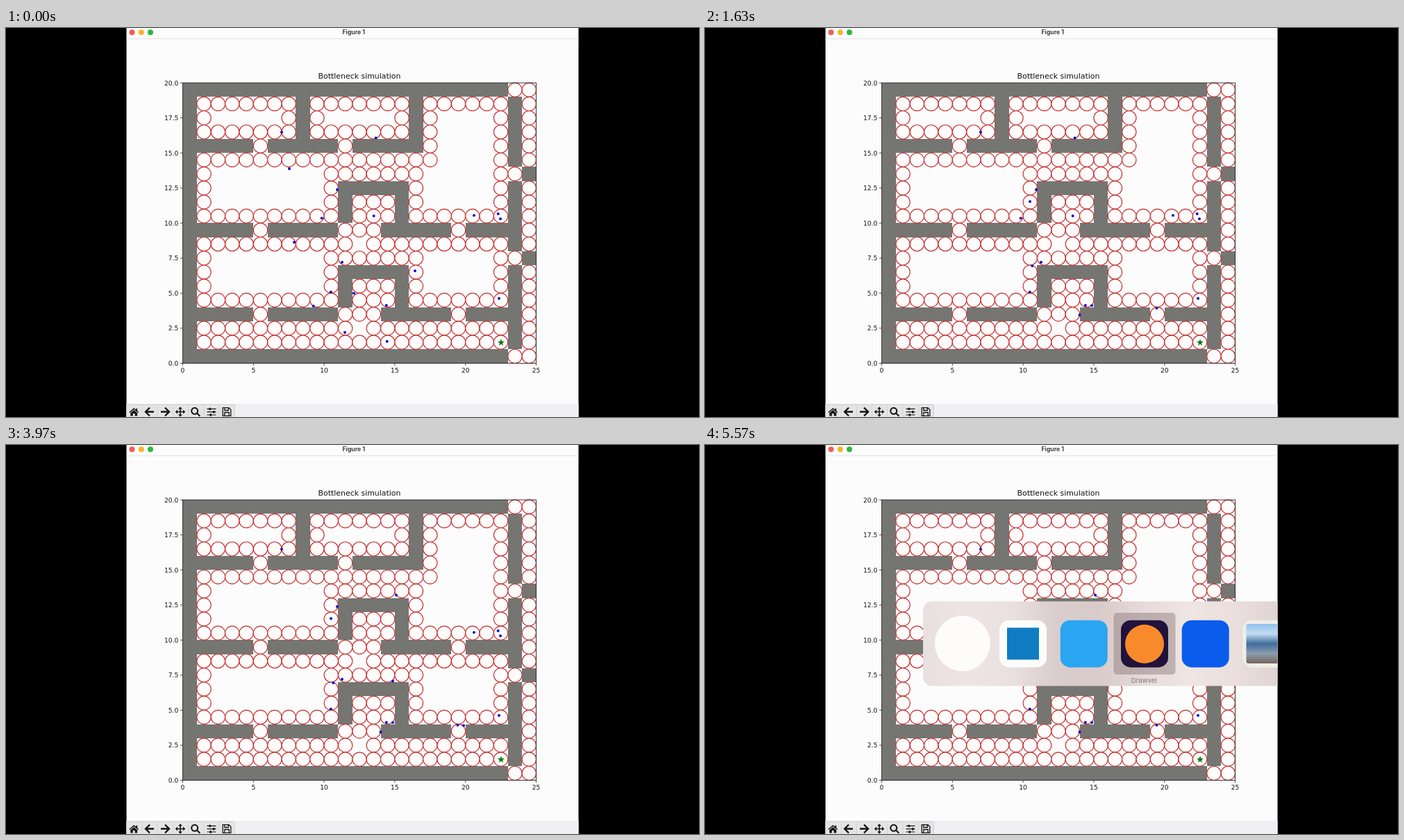
An HTML page with a canvas for the animation above (5600 ms loop, 998x561 px).

```html
<!DOCTYPE html>
<html lang="en">
<head>
<meta charset="utf-8">
<title>Bottleneck simulation</title>
<style>
html, body { margin: 0; height: 100%; overflow: hidden; background: #000; }
canvas { display: block; width: 998px; height: 561px; }
</style>
</head>
<body>
<canvas id="stage" width="998" height="561"></canvas>
<script>
const g = document.getElementById('stage').getContext('2d');
const LOOP = 5600, SPEED = 0.44; // ms, px per ms
const LEFT = 254.5, BOTTOM = 483.5, CW = 20.36, CH = 20.22;
const px = x => LEFT + x * CW, py = y => BOTTOM - y * CH;

// '#' wall, 'o' waypoint circle; first row is the top
const MAP = [
  '#######################oo',
  '#ooooooo#ooooooo#oooooo#o',
  '#o.....o#o.....o#o....o#o',
  '#ooooooo#ooooooo#o....o#o',
  '#####o#####o#####o....o#o',
  '#ooooooooooooooooo....o#o',
  '#o........ooooooo.....oo#',
  '#o........o#####o.....o#o',
  '#o........o#ooo#o.....o#o',
  '#oooooooooo#ooo#ooooooo#o',
  '#####o#####ooo#####o####o',
  '#ooooooooooo.oooooooooo#o',
  '#o........ooooooo.....oo#',
  '#o........o#####o.....o#o',
  '#o........o#ooo#o.....o#o',
  '#oooooooooo#ooo#ooooooo#o',
  '#####o#####ooo#####o####o',
  '#ooooooooooo.oooooooooo#o',
  '#oooooooooooooooooooooo#o',
  '#######################oo'
];

const RESTING = [[397, 150.3], [477, 233], [674, 270.2], [708.7, 268], [712, 275.3],
  [484, 337.8], [467.8, 380.7], [547.8, 400], [710, 390]];

// path, departure time, time it leaves the picture, time it enters
const MOVERS = [
  { path: [[408, 203], [468, 250.3]], go: 30 },
  { path: [[415, 309], [471.3, 343]], go: 30 },
  { path: [[589, 350.3], [626, 377], [650.5, 404]], go: 30 },
  { path: [[501, 382.5], [557, 400.3]], go: 30 },
  { path: [[442.7, 401], [473, 392], [485, 410], [502.5, 408.7], [539.5, 414]], go: 335 },
  { path: [[488, 439], [505, 452], [690, 451.3]], go: 30, end: 570 },
  { path: [[548.7, 452], [712, 453]], go: 30, end: 400 },
  { path: [[532.7, 158.5], [488, 170], [498, 200], [562, 216.5]], go: 1960 },
  { path: [[454.7, 274.3], [478, 281], [490, 300], [557, 340.5]], go: 1960 },
  { path: [[529.7, 271], [510, 291], [500, 328], [590, 345], [659, 404.5]], go: 2074, end: 4400 },
  { path: [[659, 404.5], [652, 415], [690, 451.3]], go: 4400, end: 4540, from: 4400 }
];

function along(path, dist) {
  for (let i = 1; i < path.length; i++) {
    const [x, y] = path[i - 1], dx = path[i][0] - x, dy = path[i][1] - y;
    const len = Math.hypot(dx, dy);
    if (dist < len) return [x + dx * dist / len, y + dy * dist / len];
    dist -= len;
  }
  return path[path.length - 1];
}

function rect(x, y, w, h, fill, r = 0) {
  g.fillStyle = fill;
  g.beginPath();
  g.roundRect(x, y, w, h, r);
  g.fill();
}

function disc(x, y, r, fill) {
  g.fillStyle = fill;
  g.beginPath();
  g.arc(x, y, r, 0, 7);
  g.fill();
}

function line(color, width, ...points) {
  g.strokeStyle = color;
  g.lineWidth = width;
  g.beginPath();
  points.forEach(([x, y], i) => i ? g.lineTo(x, y) : g.moveTo(x, y));
  g.stroke();
}

function text(str, x, y, font, align = 'center', fill = '#111') {
  g.font = font;
  g.textAlign = align;
  g.fillStyle = fill;
  g.fillText(str, x, y);
}

function blend(x0, y0, x1, y1, ...stops) {
  const grad = g.createLinearGradient(x0, y0, x1, y1);
  stops.forEach((c, i) => grad.addColorStop(i / (stops.length - 1), c));
  return grad;
}

function icon(x, y, d, width) {
  g.save();
  g.translate(x, y);
  g.fillStyle = g.strokeStyle = '#151515';
  g.lineWidth = width;
  width ? g.stroke(new Path2D(d)) : g.fill(new Path2D(d));
  g.restore();
}

function drawWindow() {
  rect(0, 0, 998, 561, '#000');
  rect(173.5, 0, 651, 561, '#fdfcfd');
  rect(173.5, 15, 651, 1, '#e3e2e3');
  disc(181.5, 6.3, 4, '#ec5f58');
  disc(194.8, 6.3, 4, '#f5b32f');
  disc(208, 6.3, 4, '#2db83d');
  text('Figure 1', 500.7, 9.4, 'bold 8.6px Inter, sans-serif', 'center', '#3d3d3d');
}

function drawToolbar() {
  rect(173.5, 542, 651, 19, '#f0eff1');
  rect(173.5, 543, 155.5, 18, '#e5e4e5');
  for (let i = 0; i < 8; i++) rect(173.5 + i * 22.2, 543, 0.8, 18, '#cfcfcf');
  rect(173.5, 542.6, 155.5, 0.8, '#cfcfcf');
  const arrow = 'M-6 0H6M0-6L-6 0L0 6';
  icon(184.2, 554, 'M-7 0L0-6L3-3.4V-5.2H5V-1.7L7 0L6 1L0-4L-6 1ZM-5 1.2L0-2.9L5 1.2V5.5H1.4V2H-1.4V5.5H-5Z');
  icon(207, 553.5, arrow, 2.4);
  g.save();
  g.scale(-1, 1);
  icon(-229, 553.5, arrow, 2.4);
  g.restore();
  icon(251, 553.5, 'M-5 0H5M0-5V5', 1.6);
  icon(251, 553.5, 'M0-7.3L3-4H-3ZM0 7.3L3 4H-3ZM-7.3 0L-4-3V3ZM7.3 0L4-3V3Z');
  icon(273, 553.5, 'M3.2-1.2A4.5 4.5 0 1 1-5.8-1.2A4.5 4.5 0 1 1 3.2-1.2M2 2L6.3 6.3', 2.1);
  icon(296, 553.7, 'M-6.5-4.3H6.5M-6.5 0H6.5M-6.5 4.3H6.5', 1.2);
  icon(296, 553.7, 'M-3.5-6H-1V-2.6H-3.5ZM2-1.7H4.5V1.7H2ZM-2.5 2.6H0V6H-2.5Z');
  icon(318, 553.5, 'M-5.8-5.8H3L5.8-3V5.8H-5.8ZM-3.2-5.5V-2H2.2V-5.5M-3.2 5.5V1H3.2V5.5', 1.3);
}

function drawPlot() {
  MAP.forEach((row, r) => [...row].forEach((cell, c) => {
    if (cell !== '#') return;
    const x = Math.round(px(c)), y = Math.round(py(20 - r));
    rect(x, y, Math.round(px(c + 1)) - x, Math.round(py(19 - r)) - y, '#757572');
  }));
  g.strokeStyle = '#c53232';
  g.lineWidth = 1.15;
  g.fillStyle = '#fffdfc';
  MAP.forEach((row, r) => [...row].forEach((cell, c) => {
    if (cell !== 'o') return;
    g.beginPath();
    g.ellipse(px(c + 0.5), py(19.5 - r), CW / 2, CH / 2, 0, 0, 7);
    g.fill();
    g.stroke();
  }));
  g.strokeStyle = '#222';
  g.lineWidth = 0.9;
  g.strokeRect(LEFT, py(20), CW * 25, CH * 20);

  const font = '9.11px "DejaVu Sans", sans-serif';
  for (let v = 0; v <= 25; v += 5) {
    line('#222', 0.8, [px(v), BOTTOM], [px(v), BOTTOM + 3.5]);
    text(v, px(v), 497, font);
  }
  for (let v = 0; v <= 20; v += 2.5) {
    line('#222', 0.8, [LEFT - 3.5, py(v)], [LEFT, py(v)]);
    text(v.toFixed(1), 248.2, py(v) + 3.4, font, 'right');
  }
  text('Bottleneck simulation', 509, 73, '10.93px "DejaVu Sans", sans-serif');

  g.fillStyle = '#087808';
  g.beginPath();
  for (let i = 0; i < 10; i++) {
    const a = i * Math.PI / 5, r = i % 2 ? 2.1 : 5.4;
    g.lineTo(713 + r * Math.sin(a), 453.6 - r * Math.cos(a));
  }
  g.fill();
}

function drawDots(t) {
  const dot = ([x, y]) => disc(x, y, 2, '#0b0bd2');
  RESTING.forEach(dot);
  for (const { path, go, end = LOOP, from = 0 } of MOVERS)
    if (t >= from && t < end) dot(along(path, Math.max(0, t - go) * SPEED));
}

function drawSwitcher(pick) {
  g.save();
  g.beginPath();
  g.rect(173.5, 0, 651, 561);
  g.clip();
  rect(314, 225.5, 560, 122, blend(314, 0, 825, 0,
    '#e8e0de', '#eee4e3', '#eae0df', '#d9cdcd', '#d8cbc9', '#e6dbda', '#efe5e3', '#eadfdd', '#dfd4d3'), 13);
  rect(501 + pick * 87.5, 242, 89, 89, 'rgba(112, 92, 92, .36)', 5);
  text(['Trunda', 'Drawvel'][pick], 544.7 + pick * 87.5, 343.3, '9.6px Inter, sans-serif', 'center', '#817a79');

  const tile = (x, fill) => rect(x, 252.7, 68, 68, fill, 14);
  disc(370.8, 286.3, 40, '#fdfcfb');
  tile(424, '#fcfcfc');
  rect(435, 263.5, 46, 46, '#0f7cc4');
  tile(511.7, '#2aa5f2');
  tile(599, '#20123a');
  disc(633, 287, 28, '#f98a2b');
  tile(686.7, '#0a5cec');
  tile(774, '#efeee6');
  rect(779.5, 258, 57, 57, blend(0, 258, 0, 315,
    '#8fc0ee', '#c3dcf0', '#3f6c9c', '#8c9db0', '#75665c'), 3);
  g.restore();
}

function frame(now) {
  const t = now % LOOP;
  drawWindow();
  drawToolbar();
  drawPlot();
  drawDots(t);
  if (t >= 5310) drawSwitcher(t < 5450 ? 0 : 1);
}

let start;
function tick(now) {
  start ??= now;
  frame(now - start);
  requestAnimationFrame(tick);
}
frame(0);
requestAnimationFrame(tick);
</script>
</body>
</html>
```
